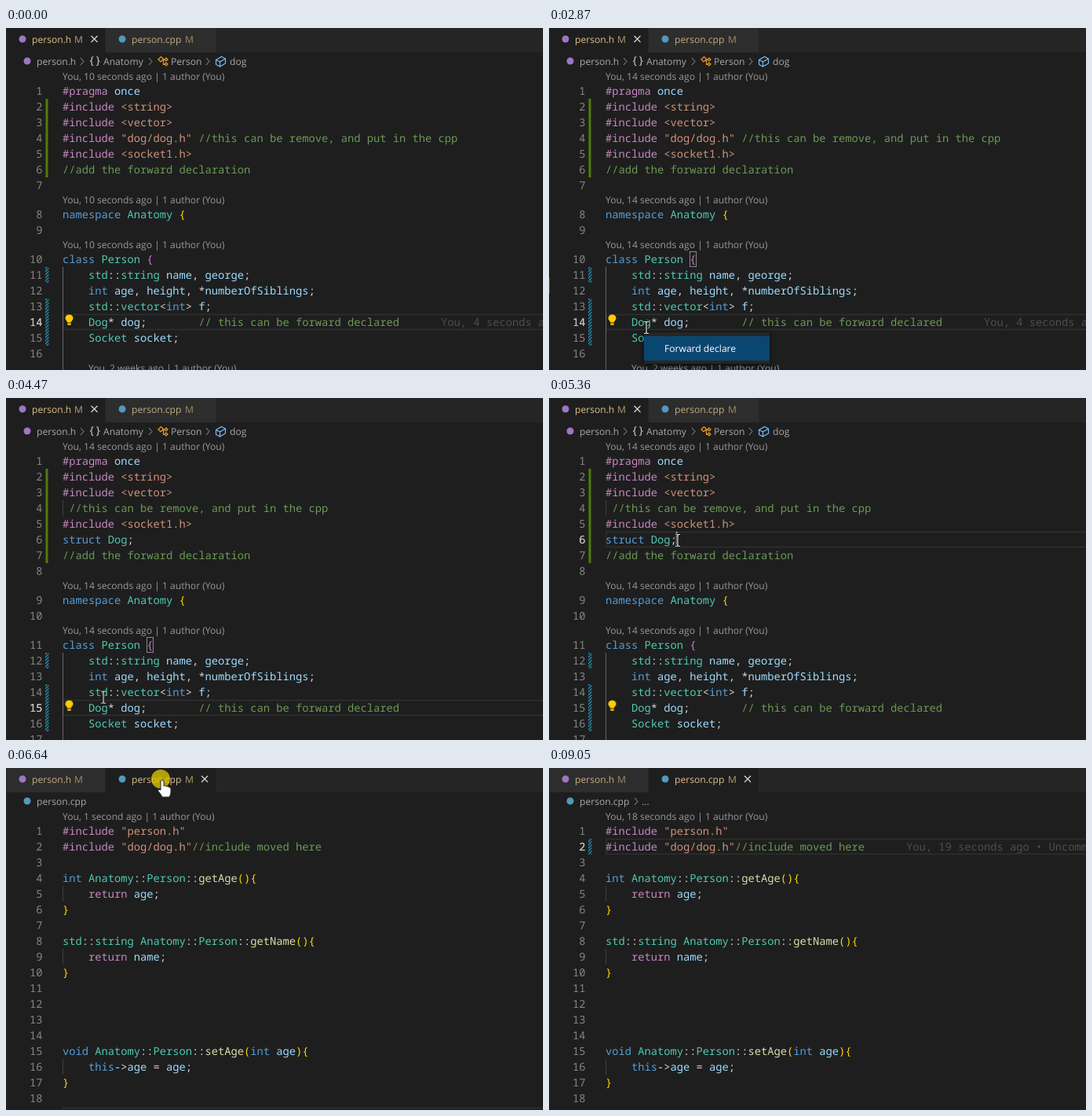
These frames come from a looping animation (684 by 435 pixels, 9330 ms). An HTML page:

```html
<!DOCTYPE html>
<html lang="en">
<head>
<meta charset="utf-8">
<title>Forward declare</title>
<style>
  html, body { margin: 0; width: 100%; height: 100%; overflow: hidden; background: #1e1e1e; }
  svg { display: block; width: 684px; height: 435px; }
  text { text-rendering: geometricPrecision; }
  .code { font: 13.75px "Noto Sans Mono", monospace; }
  .ui { font: 12.1px "Open Sans", sans-serif; }
</style>
</head>
<body>
<svg id="stage" viewBox="0 0 684 435" xmlns="http://www.w3.org/2000/svg">
  <defs>
    <pattern id="hatch" width="4" height="4" patternUnits="userSpaceOnUse">
      <path d="M-1 1L1 -1M0 4L4 0M3 5L5 3" stroke="#2490b8" stroke-width="1.3"/>
    </pattern>
    <filter id="shadow" x="-10%" y="-30%" width="120%" height="160%">
      <feDropShadow dx="0" dy="2" stdDeviation="3" flood-color="#000" flood-opacity=".6"/>
    </filter>
  </defs>
</svg>
<script>
const LOOP = 9330, EDIT = 3940, SWITCH = 6570, CLICK = 7540;
const LEFT = 72, CHAR = 8.25, ROW = 20;
const stage = document.getElementById('stage');

const add = (parent, tag, attrs = {}) => {
  const el = document.createElementNS('http://www.w3.org/2000/svg', tag);
  for (const k in attrs) el.setAttribute(k, attrs[k]);
  return parent.appendChild(el);
};
const group = (parent = stage) => add(parent, 'g');
const rect = (parent, x, y, width, height, fill, more) =>
  add(parent, 'rect', { x, y, width, height, fill, ...more });
const path = (parent, d, stroke, more) =>
  add(parent, 'path', { d, stroke, fill: 'none', ...more });
const circle = (parent, cx, cy, r, fill, more) =>
  add(parent, 'circle', { cx, cy, r, fill, ...more });
const text = (parent, x, y, str, fill, cls = 'ui', more) => {
  const el = add(parent, 'text', { x, y, fill, class: cls, ...more });
  el.textContent = str;
  return el;
};

const play = (el, frames) => el.animate(frames, { duration: LOOP, iterations: Infinity });
// times alternate between on and off
const show = (el, ...times) => {
  const key = (t, opacity) => ({ offset: t / LOOP, opacity, easing: 'step-end' });
  const keys = times.map((t, i) => key(t, 1 - i % 2));
  if (times[0] > 0) keys.unshift(key(0, 0));
  play(el, [...keys, key(LOOP, times.length % 2)]);
  return el;
};
// points: [time, x, y, easing]
const move = (el, points) => {
  const key = ([t, x, y, easing = 'linear']) =>
    ({ offset: t / LOOP, transform: `translate(${x}px, ${y}px)`, easing });
  const last = points[points.length - 1];
  play(el, [key([0, ...points[0].slice(1, 3), 'step-end']), ...points.map(key),
            key([LOOP, last[1], last[2]])]);
};

// syntax colouring
const RULES = [
  [/\/\/.*/, '#6a9955'],
  [/#\w+|\breturn\b/, '#c586c0'],
  [/"[^"]*"|(?<=include )<[^>]*>/, '#ce9178'],
  [/\b(?:namespace|class|struct|int|void|this)\b/, '#569cd6'],
  [/\b(?:std|string|vector|Anatomy|Person|Dog|Socket)\b/, '#4ec9b0'],
  [/\b[gs]et[A-Z]\w*/, '#dcdcaa'],
  [/(?<=Person )\{/, '#da70d6'],
  [/[(){}]/, '#ffd700'],
  [/\w+/, '#9cdcfe'],
  [/[^\s\w]/, '#d4d4d4'],
];
const LEXER = new RegExp(RULES.map(([re]) => `(${re.source})`).join('|'), 'g');
const codeLine = (parent, str, top) => {
  const el = add(parent, 'text', { y: top + 15, class: 'code' });
  for (const m of str.matchAll(LEXER)) {
    const kind = m.slice(1).findIndex(s => s !== undefined);
    add(el, 'tspan', { x: LEFT + m.index * CHAR, fill: RULES[kind][1] }).textContent = m[0];
  }
};

const lineNo = (parent, n, top, fill) =>
  text(parent, 46.5, top + 15, n, fill, 'code', { 'text-anchor': 'end' });
const LENS = '~';
const page = (parent, rows) => {
  const lenses = [];
  let top = 53, n = 0;
  for (const row of rows) {
    if (row === LENS) { lenses.push(top); top += 17; continue; }
    lineNo(parent, ++n, top, '#858585');
    codeLine(parent, row, top);
    top += ROW;
  }
  return lenses;
};
const lens = (parent, tops, ago, x = LEFT) => {
  const g = group(parent);
  tops.forEach(top => text(g, x, top + 13, `You, ${ago} ago | 1 author (You)`, '#999'));
  return g;
};
const blame = (parent, x, top, ago) =>
  text(parent, x, top + 15, `You, ${ago} ago • Uncommitted changes`, '#4d4d4d', 'code');
const current = (parent, n, top) => {
  const g = group(parent);
  rect(g, 73, top + .5, 620, ROW - 1, 'none', { stroke: '#303030', 'stroke-width': 1.5 });
  if (n) lineNo(g, n, top, '#d0d0d0');
  return g;
};
const added = (parent, top, rows) => rect(parent, 50.5, top, 3, rows * ROW, '#4d7d0c');
const changed = (parent, top, rows) => rect(parent, 50, top, 4.5, rows * ROW, 'url(#hatch)');
const guide = (parent, top, height, color = '#404040') => rect(parent, LEFT, top, 1, height, color);
const bulb = (parent, y) => {
  const g = add(parent, 'g', { transform: `translate(80.5 ${y})` });
  add(g, 'path', { d: 'M-2.5 3.5C-2.5 1.5-5 .8-5-2A5 4.6 0 0 1 5-2C5 .8 2.5 1.5 2.5 3.5Z', fill: '#fc0' });
  rect(g, -2.3, 4.2, 4.6, 2.8, '#e0b400', { rx: 1 });
  return g;
};

// source files
const tail = [
  '', LENS, 'namespace Anatomy {', '', LENS, 'class Person {',
  '    std::string name, george;',
  '    int age, height, *numberOfSiblings;',
  '    std::vector<int> f;',
  '    Dog* dog;        // this can be forward declared',
  '    Socket socket;', '',
];
const head = [LENS, '#pragma once', '#include <string>', '#include <vector>'];
const note = ' //this can be remove, and put in the cpp';
const socket = '#include <socket1.h>', todo = '//add the forward declaration';
const before = [...head, '#include "dog/dog.h"' + note, socket, todo, ...tail];
const after = [...head, note, socket, 'struct Dog;', todo, ...tail];
const cpp = [
  LENS, '#include "person.h"', '#include "dog/dog.h"//include moved here', '',
  'int Anatomy::Person::getAge(){', '    return age;', '}', '',
  'std::string Anatomy::Person::getName(){', '    return name;', '}', '', '', '', '',
  'void Anatomy::Person::setAge(int age){', '    this->age = age;', '}', '',
];

rect(stage, 0, 0, 684, 435, '#1e1e1e');

// header before the edit
const h1 = show(group(), 0, EDIT);
current(h1, 0, 364);
guide(h1, 304, 131, '#666');
added(h1, 90, 5);
changed(h1, 304, 1);
changed(h1, 344, 3);
const tops1 = page(h1, before);
lineNo(h1, 14, 364, '#d0d0d0');
show(lens(h1, tops1, '10 seconds'), 0, 2080);
show(lens(h1, tops1, '14 seconds'), 2080);
lens(h1, [424], '2 weeks', 105);
blame(h1, 554, 364, '4 seconds');
bulb(h1, 371);
const matchBox = (parent, y) =>
  rect(parent, 179.5, y + .5, 8, 19, 'none', { stroke: '#8a8a8a' });
show(matchBox(h1, 284), 1670);

// header after the edit
const h2 = show(group(), EDIT, SWITCH);
show(current(h2, 15, 384), EDIT, 5360);
show(current(h2, 0, 170), 5360, 5443);
const picked = rect(h2, -11 * CHAR, 170, 11 * CHAR, ROW, '#264f78');
const DRAG = [5400, 5870], END = LEFT + 11 * CHAR;
const scale = (t, s, easing) =>
  ({ offset: t / LOOP, transform: `translate(${END}px, 0px) scaleX(${s})`, easing });
play(picked, [scale(0, 0, 'step-end'), scale(DRAG[0], 0, 'steps(11)'),
              scale(DRAG[1], 1, 'step-end'), scale(LOOP, 1)]);
guide(h2, 324, 111, '#666');
guide(h2, 130, ROW);
added(h2, 90, 6);
changed(h2, 324, 1);
changed(h2, 364, 3);
lens(h2, page(h2, after), '14 seconds');
show(lineNo(h2, 15, 384, '#d0d0d0'), EDIT, 5360);
show(lineNo(h2, 6, 170, '#d0d0d0'), 5360);
show(circle(h2, LEFT + 6.5 * CHAR, 181, .8, '#7d93a6'), 5613);
show(blame(h2, 554, 384, '4 seconds'), 4540, 5360);
show(blame(h2, 216, 170, '2 seconds'), 5430);
show(bulb(h2, 371), EDIT, 4200);
show(bulb(h2, 391), 4400);
show(matchBox(h2, 304), EDIT, 5360);

// implementation file
const impl = show(group(), SWITCH);
show(current(impl, 0, 432), SWITCH, CLICK);
show(current(impl, 0, 90), CLICK);
[150, 230, 370].forEach(y => guide(impl, y, ROW));
const tops3 = page(impl, cpp);
show(lens(impl, tops3, '1 second'), SWITCH, CLICK);
show(lens(impl, tops3, '18 seconds'), CLICK);
const edited = show(group(impl), CLICK);
lineNo(edited, 2, 90, '#d0d0d0');
changed(edited, 90, 1);
blame(edited, 455, 90, '19 seconds');

// tabs and breadcrumbs
const VIOLET = '#a074c4', BLUE = '#519aba';
const cross = (parent, x) =>
  path(parent, `M${x - 4} 10l8 8m0-8l-8 8`, '#d4d4d4', { 'stroke-width': 1.3 });
const chevron = (parent, x) => path(parent, `M${x - 2} 38l4 4.5l-4 4.5`, '#999');
const tab = (parent, x, w, name, color, active) => {
  rect(parent, x, 0, w, 31, active ? '#1e1e1e' : '#2d2d2d');
  circle(parent, x + 21, 14, 4.5, color);
  const label = add(parent, 'g', { opacity: active ? 1 : .85 });
  text(label, x + 33, 18.5, name, '#e2c08d');
  text(label, x + w - 39, 18.5, 'M', '#b59c72');
};
const tabs = (parent, active) => {
  rect(parent, 0, 0, 684, 31, '#252526');
  tab(parent, 0, 126, 'person.h', VIOLET, active === 0);
  tab(parent, 127, 140, 'person.cpp', BLUE, active === 1);
};

const top1 = show(group(), 0, SWITCH);
tabs(top1, 0);
show(cross(top1, 112.5), 0, EDIT, 4010);
show(circle(top1, 112.5, 14, 4, '#d4d4d4'), EDIT, 4010);
circle(top1, 27, 42, 4.5, VIOLET);
[[39, 'person.h'], [124, 'Anatomy'], [210, 'Person'], [285, 'dog']]
  .forEach(([x, s]) => text(top1, x, 46.5, s, '#a9a9a9'));
[97, 184, 257].forEach(x => chevron(top1, x));
text(top1, 105, 46, '{}', '#ccc', 'code');
path(top1, 'M194 40l3.5-3.5l3 3l-3.5 3.5zM199 41h3m-1.5 0v5.5h2M202 40l2-2l2 2l-2 2zM202 46l2-2l2 2l-2 2z',
  '#ee9d28', { 'stroke-width': 1.2 });
path(top1, 'M267.5 40.5l7-4l5 2.5v6l-7 4l-5-2.5zM267.5 40.5l5 2.5l7-4M272.5 43v6',
  '#75beff', { 'stroke-width': 1.2 });

const top2 = show(group(), SWITCH);
tabs(top2, 1);
cross(top2, 253);
circle(top2, 27, 42, 4.5, BLUE);
text(top2, 39, 46.5, 'person.cpp', '#a9a9a9');
const more = show(group(top2), CLICK);
chevron(more, 111);
text(more, 118, 46.5, '...', '#a9a9a9');

rect(stage, 0, 0, 1, 435, '#252526');
show(rect(stage, 0, 318, 1, ROW, '#007acc'), 2870, EDIT);

// quick fix menu
const menu = show(group(), 2870, EDIT);
rect(menu, 121, 387, 160, 40, '#252526', { filter: 'url(#shadow)' });
rect(menu, 121, 392, 160, 31, '#094771');
text(menu, 147, 412, 'Forward declare', '#fff');

// text caret
const caret = show(group(), 1670, 2130, 2610, 2870, 4540, 5040, 5360, 6370, CLICK, 8050, 8510, 9050);
rect(caret, -1, 0, 2, ROW, '#aeafad');
move(caret, [
  [1670, 121.5, 364, 'step-end'], [EDIT, 121.5, 384, 'step-end'],
  [5360, END, 170, 'step-end'], [DRAG[0], END, 170, 'steps(11)'],
  [DRAG[1], LEFT, 170, 'step-end'], [CLICK, 402, 90],
]);

// pointer
const press = show(group(), SWITCH, 6710);
circle(press, 197, 14, 12, '#e6cf00', { opacity: .75 });
const pointer = show(group(), 710, 8650);
const beam = show(group(pointer), 710, 6400, 7070);
const bar = 'M-3-7.5h2l1 1l1-1h2M0-6.5v13M-3 7.5h2l1-1l1 1h2';
path(beam, bar, '#111', { 'stroke-width': 3 });
path(beam, bar, '#e4e4e4', { 'stroke-width': 1.2 });
const hand = show(group(pointer), 6400, 7070);
add(hand, 'path', {
  d: 'M-2 1.5Q0-1.5 2 1.5V8Q4 6.5 5.2 8.4Q7.3 7.4 8.4 9.4Q11 9 11 11.5V16Q11 19 9 22H0Q-2 18-5 14.5Q-6 11.5-2 13Z',
  fill: '#fff', stroke: '#222', 'stroke-width': 1,
});
move(pointer, [
  [710, 434, 412], [1050, 300, 402], [1350, 160, 386], [1540, 114, 380],
  [1610, 114, 380], [1670, 124, 381], [4470, 124, 381], [4750, 146, 270],
  [5050, 172, 112], [5290, 164, 181], [DRAG[0], 164, 181], [DRAG[1], 76, 181],
  [6020, 76, 181], [6310, 150, 70], [6500, 199, 15], [6970, 199, 15],
  [7250, 320, 70], [7480, 405, 101], [7840, 405, 101, 'ease-in-out'],
  [8180, 651, 370], [8510, 651, 370], [8650, 656, 414],
]);
</script>
</body>
</html>
```
